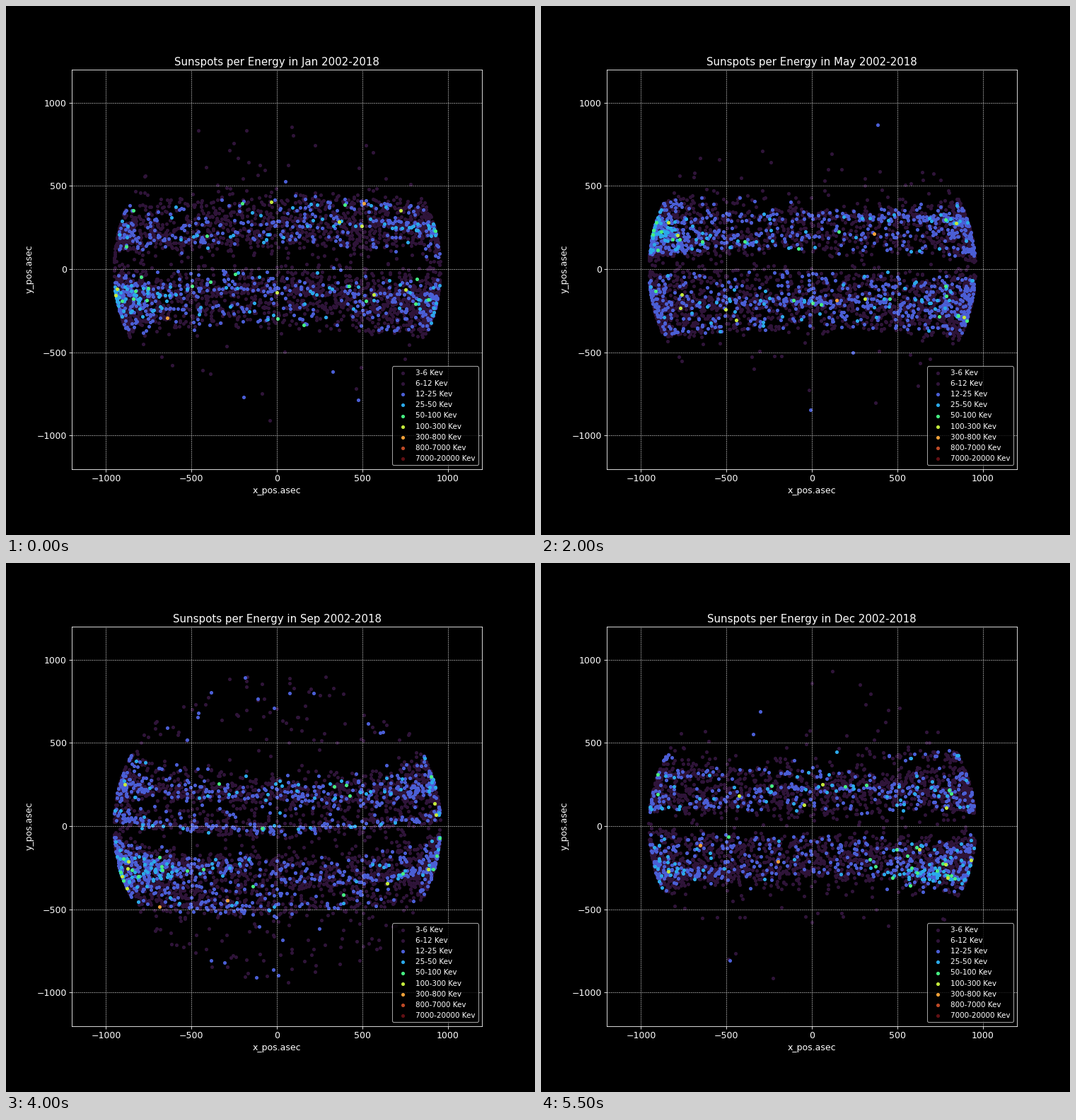
Write a matplotlib script that moves like this. It is 748x748 px and loops after 6 s.

```python
import numpy as np
import matplotlib.pyplot as plt
from matplotlib.animation import FuncAnimation

SIZE, INCHES, LIMB = 748, 10, 955
MONTHS = "Jan Feb Mar Apr May Jun Jul Aug Sep Oct Nov Dec".split()
LEVELS = [("3-6", "#2f1439"), ("6-12", "#2f1439"), ("12-25", "#4b5fd6"),
          ("25-50", "#2ba9ea"), ("50-100", "#46ee82"), ("100-300", "#c4ea3c"),
          ("300-800", "#f0a038"), ("800-7000", "#be4a26"), ("7000-20000", "#611014")]

# The most active place on the disc in each month.
SITES = [(-850, -170), (800, 285), (-700, 250), (600, -200), (-880, 225), (500, -250),
         (900, 140), (860, -260), (-800, -280), (650, -305), (-600, 220), (680, -290)]


def on_disc(x, y):
    edge = np.sqrt(LIMB ** 2 - np.clip(y, -LIMB, LIMB) ** 2)
    return np.column_stack([np.clip(x, -edge, edge), y])


def make_tracks(rng, count=90):
    """Active regions: a latitude in either belt and a mean longitude."""
    side = np.where(rng.random(count) < 0.55, -1, 1)
    lat = side * (60 + 370 * rng.beta(1.7, 2.1, count))
    return lat, rng.uniform(-1.5, 1.5, count), rng.exponential(1, count)


def belt_points(rng, tracks, count, shift, power, jitter):
    """Spots carried along their tracks; a higher power favours strong regions."""
    lat, lon, strength = tracks
    weight = (0.3 + strength) ** power
    pick = rng.choice(len(lat), count, p=weight / weight.sum())
    angle = lon[pick] + rng.normal(0, 0.55, count)
    angle = (angle + np.pi / 2) % np.pi - np.pi / 2
    y = lat[pick] + rng.normal(0, jitter, count) + shift * np.cos(angle)
    return on_disc(np.sqrt(LIMB ** 2 - y ** 2) * np.sin(angle), y)


def background(rng, count, shift):
    angle = rng.uniform(-np.pi / 2, np.pi / 2, count)
    y = rng.normal(0, 260, count).clip(-560, 560) + shift * np.cos(angle)
    return on_disc(np.sqrt(LIMB ** 2 - y ** 2) * np.sin(angle), y)


def strays(rng, count):
    radius = LIMB * rng.random(count * 8) ** 0.35
    angle = rng.uniform(0, 2 * np.pi, count * 8)
    points = np.column_stack([radius * np.cos(angle), radius * np.sin(angle)])
    return points[np.abs(points[:, 1]) > 500][:count]


def site_points(rng, site, count):
    x, y = rng.normal(site, (110, 42), (count, 2)).T
    return on_disc(x, y)


def month_points(month):
    rng = np.random.default_rng(40 + month)
    # The solar axis nods through the year, which bends and shifts both belts.
    tilt = np.sin(2 * np.pi * (month - 4.73) / 12)
    shift = -105 * tilt
    tracks = make_tracks(rng)
    scatter = int(14 + 130 * tilt ** 6)
    blue = int(900 + 250 * np.cos(2 * np.pi * (month - 5.5) / 12))

    layers = [np.empty((0, 2)) for _ in LEVELS]
    layers[1] = np.vstack([belt_points(rng, tracks, 2600, shift, 0.4, 26),
                           background(rng, 260, shift), strays(rng, scatter)])
    layers[2] = np.vstack([belt_points(rng, tracks, blue, shift, 1, 14),
                           site_points(rng, SITES[month], blue // 14),
                           strays(rng, 1 + scatter // 6)])
    for level, count in enumerate((140, 22, 9, 2), 3):
        near = count // 4
        layers[level] = np.vstack([belt_points(rng, tracks, count - near, shift, 1.4, 14),
                                   site_points(rng, SITES[month], near)])
    return layers


plt.style.use("dark_background")
plt.rcParams.update({"font.family": "DejaVu Sans", "font.size": 12})
fig, ax = plt.subplots(figsize=(INCHES, INCHES), dpi=SIZE / INCHES)
fig.subplots_adjust(left=0.1245, right=0.9, bottom=0.125, top=0.88)
ax.set(xlim=(-1200, 1200), ylim=(-1200, 1200), xlabel="x_pos.asec", ylabel="y_pos.asec",
       xticks=range(-1000, 1001, 500), yticks=range(-1000, 1001, 500))
ax.grid(True, linestyle="--", linewidth=0.5)
title = ax.set_title("")
dots = [ax.scatter([], [], s=15, color=color, label=f"{name} Kev") for name, color in LEVELS]
ax.legend(loc="lower right", fontsize="small")

charts = [month_points(i) for i in range(len(MONTHS))]


def update(i):
    title.set_text(f"Sunspots per Energy in {MONTHS[i]} 2002-2018")
    for dot, points in zip(dots, charts[i]):
        dot.set_offsets(points)
    return [title, *dots]


animation = FuncAnimation(fig, update, frames=len(MONTHS), interval=500,
                          init_func=lambda: update(0), repeat=True, repeat_delay=0)
plt.show()
```
